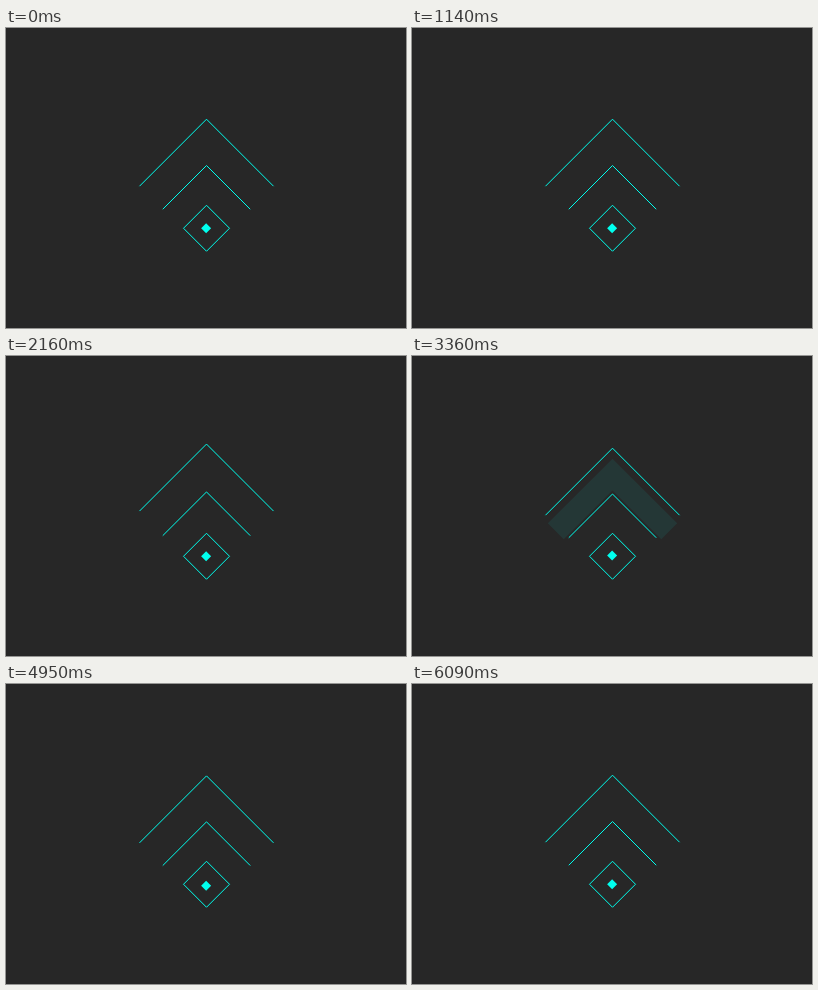
Animation of 400 by 300 pixels, one loop 6540 ms. Source, as an HTML page with a canvas:

```html
<!DOCTYPE html>
<html lang="en">
<head>
<meta charset="utf-8">
<title>Signal chevrons</title>
<style>
  html, body { margin: 0; width: 100%; height: 100%; overflow: hidden; background: #272727; }
  canvas { display: block; width: 100%; height: 100%; }
</style>
</head>
<body>
<canvas id="stage" width="400" height="300"></canvas>
<script>
const ctx = document.getElementById('stage').getContext('2d');
const LOOP = 6540, STEP = 30;
const CYAN = '#00ffee', BACK = '#272727';
const CX = 200.5;
const PULSES = [1170, 2970, 4770], PULSE_LENGTH = 1320;

const clamp = x => Math.min(1, Math.max(0, x));
const progress = (t, from, to) => clamp((t - from) / (to - from));
const mix = (a, b, p) => a + (b - a) * p;
const sineInOut = p => (1 - Math.cos(Math.PI * p)) / 2;

// Cubic Bezier easing with handles (x1, 0) and (x2, 1)
function bezierEase(p, x1, x2) {
  let lo = 0, hi = 1, s = 0.5;
  for (let i = 0; i < 24; i++) {
    s = (lo + hi) / 2;
    const x = 3 * (1 - s) ** 2 * s * x1 + 3 * (1 - s) * s * s * x2 + s ** 3;
    if (x < p) lo = s; else hi = s;
  }
  return s * s * (3 - 2 * s);
}

function trace(points, closed) {
  ctx.beginPath();
  points.forEach(([x, y]) => ctx.lineTo(x, y));
  if (closed) ctx.closePath();
}

// Corners run bottom, right, top, left
const diamond = (x, y, r) => trace([[x, y + r], [x + r, y], [x, y - r], [x - r, y]], true);

function chevron(top, half) {
  trace([[CX - half, top + half], [CX, top], [CX + half, top + half]]);
  ctx.stroke();
}

// Whole figure sinks and settles back
function sink(t) {
  return t < 420
    ? 12 * sineInOut(progress(t, 150, 420))
    : 12 * (1 - progress(t, 420, 1170)) ** 3.6;
}

// Outer chevron: slight dip, kick upwards, slow return
function kick(t) {
  if (t < 390) return Math.sin(progress(t, 0, 390) * Math.PI / 2);
  if (t < 620) return mix(1, -19, sineInOut(progress(t, 390, 620)));
  return -19 * (1 - progress(t, 620, PULSE_LENGTH)) ** 2.4;
}

function coreShift(t) {
  if (t < 180) return 1.5 * sineInOut(t / 180);
  if (t < 400) return mix(1.5, -0.7, sineInOut(progress(t, 180, 400)));
  return -0.7 * (1 - sineInOut(progress(t, 400, 900)));
}

// Faint band that widens from a point below the figure
function drawWave(t) {
  const p = progress(t, 290, 690);
  if (p <= 0 || p >= 1) return;
  const top = mix(137, 39, 1 - (1 - p) ** 1.5);
  const scale = (246 - top) / 144;
  const half = 65 * scale, depth = 16 * scale;
  trace([
    [CX - half, top + half], [CX, top], [CX + half, top + half],
    [CX + half - depth, top + half + depth], [CX, top + 2 * depth],
    [CX - half + depth, top + half + depth]
  ], true);
  ctx.globalAlpha = 0.105 * Math.sin(Math.PI * p);
  ctx.fill();
  ctx.globalAlpha = 1;
}

// Chevron that can run counterclockwise along a diamond outline
function drawRunner(y, turn) {
  const radius = 63, perimeter = radius * 4 * Math.SQRT2, length = 123.7;
  diamond(CX, y, radius);
  ctx.setLineDash([length, perimeter - length]);
  ctx.lineDashOffset = length / 2 - perimeter * (0.5 + turn);
  ctx.stroke();
  ctx.setLineDash([]);
}

function draw(t) {
  const start = PULSES.find(s => t >= s && t < s + PULSE_LENGTH);
  const local = start === undefined ? 0 : t - start;
  const lift = kick(local);
  const turn = bezierEase(progress(t, 3587, 4787), 0.5, 0.2) % 1;

  ctx.fillStyle = BACK;
  ctx.fillRect(0, 0, 400, 300);
  ctx.fillStyle = ctx.strokeStyle = CYAN;
  ctx.lineWidth = 1;

  ctx.save();
  ctx.translate(0, sink(t));
  drawWave(local);
  chevron(91.2 + lift, 67);
  drawRunner(200.5 + lift / 2, turn);
  diamond(CX, 200.25, 23);
  ctx.stroke();
  diamond(200.1, 200.25 + coreShift(local), 5);
  ctx.fill();
  ctx.restore();
}

const begin = performance.now();
function tick() {
  const t = (performance.now() - begin) % LOOP;
  draw(Math.floor(t / STEP) * STEP);
  requestAnimationFrame(tick);
}
tick();
</script>
</body>
</html>
```
